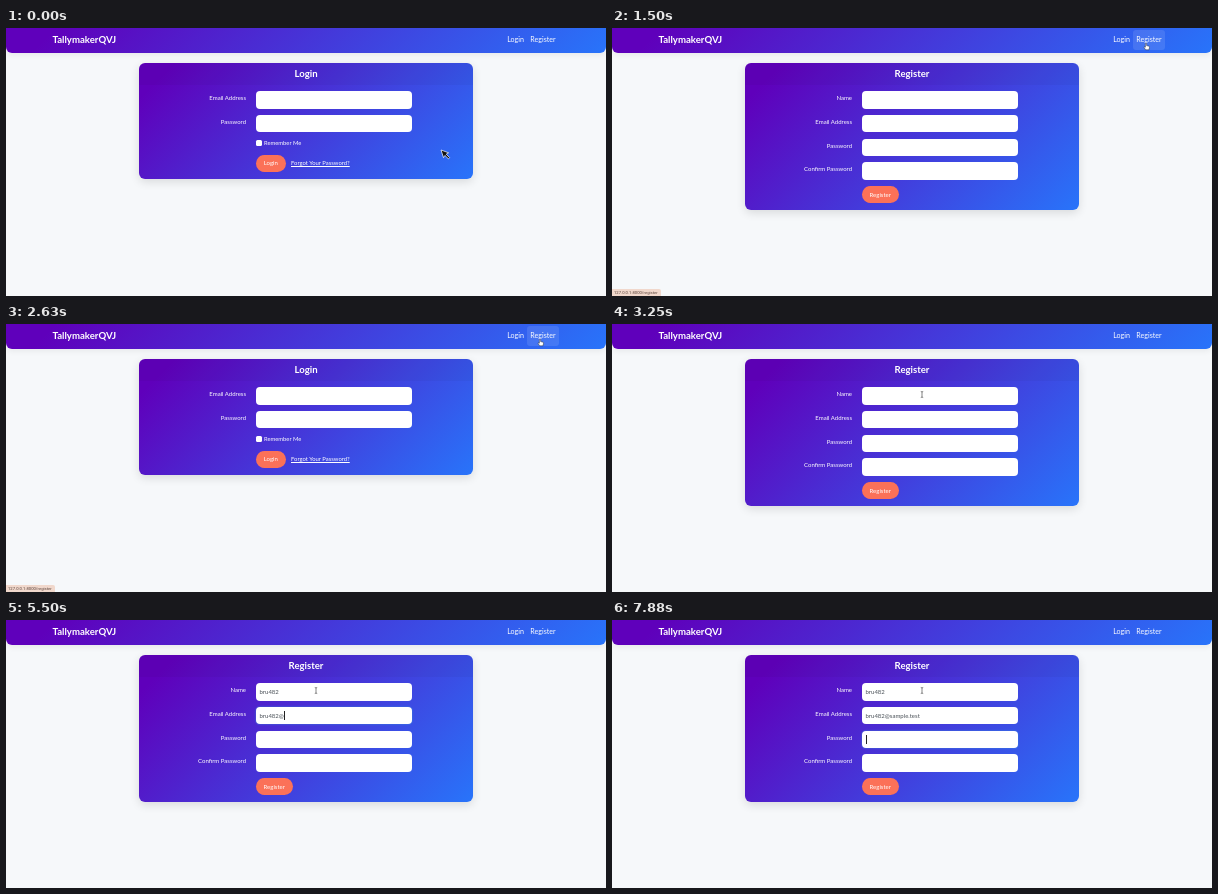
An HTML page that plays this animation: 600 px wide and 268 px high, repeating every 8 s.

```html
<!DOCTYPE html>
<html lang="en">
<head>
<meta charset="utf-8">
<title>Register</title>
<style>
html, body { margin: 0; width: 100%; height: 100%; overflow: hidden; }
body { position: relative; background: #f6f8fa; color: #fff; font: 6px/10px Lato, sans-serif; }
body *, .cursor { position: absolute; box-sizing: border-box; white-space: nowrap; }
[hidden] { display: none !important; }
nav, .card { background: linear-gradient(135deg, #5f00bb 8%, #2874fa); }
nav { left: 0; top: 0; width: 600px; height: 25px; border-radius: 0 0 6px 6px; box-shadow: 0 2px 6px #0001; }
.brand { left: 46.5px; top: 7px; font-size: 9.6px; font-weight: 700; }
.link { top: 1.5px; height: 20.5px; line-height: 20.5px; border-radius: 3px; font-size: 7.1px; text-align: center; }
.link.hover { background: #ffffff1c; }
#toLogin { left: 498px; width: 23px; }
#toRegister { left: 521px; width: 32px; }
.card { left: 133px; top: 35px; width: 334px; border-radius: 6px; box-shadow: 0 3px 10px #0000001f; overflow: hidden; }
#login { height: 116px; }
#register { height: 147px; }
h1 { left: 0; top: 0; margin: 0; width: 100%; height: 22px; background: #00000009; font-size: 9.6px; line-height: 22px; text-align: center; }
.row { left: 0; top: calc(28.2px + 23.7px * var(--i)); width: 100%; height: 18px; }
.row label { right: 227px; top: 2.2px; }
.row div { left: 116.5px; top: 0; width: 156px; height: 17.6px; padding-left: 4px; border-radius: 4px; background: #fff; color: #495057; line-height: 17.6px; }
.row .focus { box-shadow: 0 0 0 1.3px #3490dc40; }
.row span { position: static; }
.row .focus.lit span { border-right: .6px solid #222; padding: 1px .3px 1px 0; }
button { left: 116.5px; height: 17.6px; padding: 0; border: 0; border-radius: 9px; background: #fb7158; color: #fff; font: inherit; text-align: center; }
#login button { top: 91.5px; width: 30.5px; }
#register button { top: 122.9px; width: 37.5px; }
.check { left: 116.5px; top: 77px; width: 6px; height: 6px; border-radius: 1.5px; background: #fff; }
.remember { left: 125px; top: 75px; font-size: 5.8px; }
.forgot { left: 152px; top: 95px; font-size: 5.9px; text-decoration: underline; text-decoration-thickness: .5px; }
#status { left: 0; bottom: 0; height: 6.6px; padding: 0 3px 0 2px; border-radius: 0 2px 0 0; background: #f1d8cc; color: #59423a; font: 4.2px/7.4px Roboto, sans-serif; }
.cursor { left: 0; top: 0; width: 14px; height: 14px; overflow: visible; }
</style>
</head>
<body>
<nav>
  <div class="brand">TallymakerQVJ</div>
  <div class="link" id="toLogin">Login</div>
  <div class="link" id="toRegister">Register</div>
</nav>

<section class="card" id="login">
  <h1>Login</h1>
  <div class="row" style="--i:0"><label>Email Address</label><div></div></div>
  <div class="row" style="--i:1"><label>Password</label><div></div></div>
  <i class="check"></i>
  <div class="remember">Remember Me</div>
  <button>Login</button>
  <div class="forgot">Forgot Your Password?</div>
</section>

<section class="card" id="register" hidden>
  <h1>Register</h1>
  <div class="row" style="--i:0"><label>Name</label><div><span></span></div></div>
  <div class="row" style="--i:1"><label>Email Address</label><div><span></span></div></div>
  <div class="row" style="--i:2"><label>Password</label><div><span></span></div></div>
  <div class="row" style="--i:3"><label>Confirm Password</label><div><span></span></div></div>
  <button>Register</button>
</section>

<div id="status" hidden></div>

<svg class="cursor" id="arrow"><path d="M0 0L7.6 2.8 5.2 4.2 8.6 7.6 7.4 8.8 3.9 5.4 2.5 7.6Z" fill="#111" stroke="#fff" stroke-width=".7"/></svg>
<svg class="cursor" id="hand"><path d="M-.6 .5Q0-.3 .6 .5V2.6L3 3.2Q3.6 3.4 3.5 4.2L3 6.8H-.4L-2 4.2Q-1.7 3.4-.6 4.2Z" fill="#fff" stroke="#222" stroke-width=".45"/></svg>
<svg class="cursor" id="beam"><path d="M-1.2-3Q0-3 0-2.2Q0-3 1.2-3M0-2.2V2.2M-1.2 3Q0 3 0 2.2Q0 3 1.2 3" fill="none" stroke="#333" stroke-width=".6"/></svg>

<script>
const LOOP = 8000, STEP = 125;
const $ = id => document.getElementById(id);
const fields = [...document.querySelectorAll('#register .row div')];

// Pointer stops: step, x, y
const stops = [[0, 435, 122], [2, 439, 117], [7, 534, 15], [13, 534, 15], [15, 509, 14],
  [17, 509, 14], [19, 534, 15], [23, 534, 15], [26, 310, 70.5], [64, 310, 70.5]];

// Typing runs: field, first step, last step, text already there, text added
const runs = [
  [0, 29, 33, '', 'bru482'],
  [1, 37, 42, '', 'bru482'],
  [1, 44, 44, 'bru482', '@'],
  [1, 46, 59, 'bru482@', 'sample.test']
];

function pointer(n) {
  const k = stops.findIndex(s => s[0] > n);
  const [a, x0, y0] = stops[k - 1], [b, x1, y1] = stops[k];
  const p = (n - a) / (b - a), e = p * p * (3 - 2 * p);
  return [x0 + (x1 - x0) * e, y0 + (y1 - y0) * e];
}

function typed(field, n) {
  let text = '';
  for (const [f, from, to, base, add] of runs) {
    if (f !== field || n < from) continue;
    text = base + add.slice(0, Math.ceil(add.length * (n - from + 1) / (to - from + 1)));
  }
  return text;
}

function draw(n) {
  const registering = (n >= 10 && n < 17) || n >= 23;
  $('login').hidden = registering;
  $('register').hidden = !registering;

  const [x, y] = pointer(n);
  const over = y < 23 && x > 498 && x < 553 ? (x < 521 ? 'login' : 'register') : '';
  $('toLogin').classList.toggle('hover', over === 'login');
  $('toRegister').classList.toggle('hover', over === 'register');
  $('status').hidden = !over;
  $('status').textContent = '127.0.0.1:8000/' + over;

  const shape = over ? 'hand' : n >= 26 ? 'beam' : 'arrow';
  for (const id of ['arrow', 'hand', 'beam']) {
    $(id).style.display = id === shape ? '' : 'none';
    $(id).style.transform = `translate(${x}px, ${y}px)`;
  }

  const focus = n < 27 ? -1 : n < 35 ? 0 : n < 61 ? 1 : 2;
  const start = [27, 35, 61][focus];
  const typing = runs.some(r => n >= r[1] && n <= r[2] + 1);
  const lit = typing || Math.floor((n - start) / 4) % 2 === 0;
  fields.forEach((box, i) => {
    box.firstChild.textContent = typed(i, n) || '\u200b';
    box.classList.toggle('focus', i === focus);
    box.classList.toggle('lit', lit);
  });
}

const t0 = performance.now();
function tick() {
  draw(Math.floor((performance.now() - t0) % LOOP / STEP));
  requestAnimationFrame(tick);
}
tick();
</script>
</body>
</html>
```
